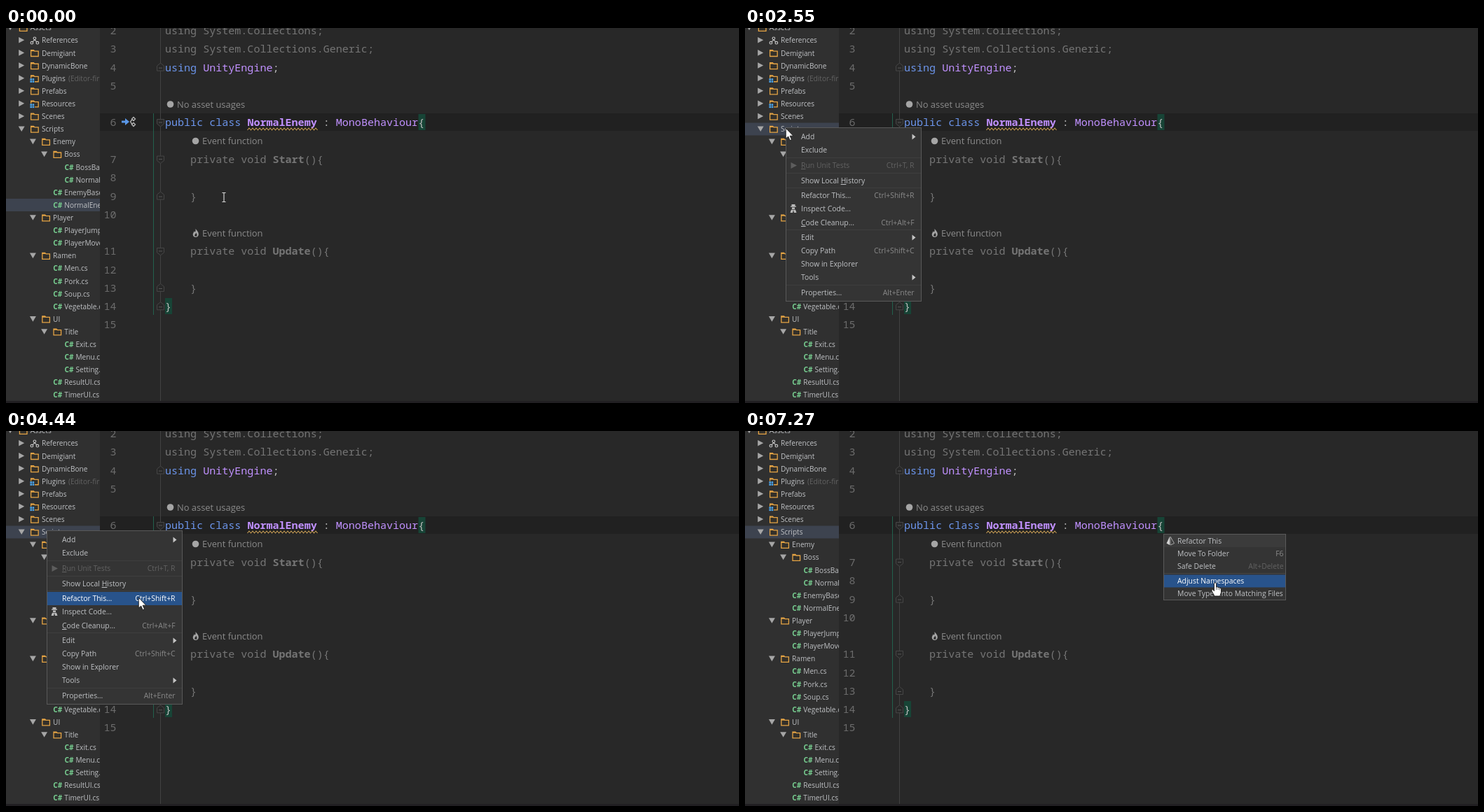
An HTML page that plays this animation: 1046x536 px, repeating every 8 s.

```html
<!DOCTYPE html>
<html lang="en">
<head>
<meta charset="utf-8">
<title>Code editor</title>
<style>
html, body { margin: 0; width: 100%; height: 100%; overflow: hidden; background: #282828; }
svg { display: block; width: 1046px; height: 536px; }
text { white-space: pre; }
.ui { font: 10.1px "Open Sans", sans-serif; fill: #bfc1c4; }
.menu { font: 10.4px "Open Sans", sans-serif; fill: #bfc1c4; }
.hint { font: 12.9px "Open Sans", sans-serif; fill: #8b8b8b; }
.code { font: 15.05px "Noto Sans Mono", monospace; fill: #bdbdbd; }
.cs { font: bold 10.2px "Open Sans", sans-serif; fill: #78cf91; }
.key { fill: #6c95eb; }
.type { fill: #c191ff; }
.dim { fill: #757575; }
.bold { font-weight: bold; }
.under { text-decoration: underline; }
.right { text-anchor: end; }
.num { fill: #6c6c6c; }
.soft { fill: #8a8a8a; }
.off { fill: #626262; }
.lit, .lit tspan { fill: #fff; }
</style>
</head>
<body>
<svg id="stage" viewBox="0 0 1046 536"></svg>
<script>
const NS = "http://www.w3.org/2000/svg";
const LOOP = 8000;
const EDITOR = "#282828", SIDE = "#303030", PANEL = "#343434";
const stage = document.getElementById("stage");

function add(parent, tag, attrs = {}, content) {
  const el = document.createElementNS(NS, tag);
  for (const k in attrs) el.setAttribute(k, attrs[k]);
  if (content !== undefined) el.textContent = content;
  parent.append(el);
  return el;
}
const group = (parent, x = 0, y = 0) => add(parent, "g", { transform: `translate(${x} ${y})` });
const rect = (parent, x, y, width, height, fill, more) =>
  add(parent, "rect", { x, y, width, height, fill, ...more });
const path = (parent, d, fill, stroke = "none", more) => add(parent, "path", { d, fill, stroke, ...more });
// Baselines sit on whole pixels to stay crisp.
const label = (parent, x, y, cls, str) => add(parent, "text", { x, y: Math.round(y), class: cls }, str);

// Each run is [class, string].
function runs(parent, x, y, cls, list) {
  const t = label(parent, x, y, cls);
  for (const [c, s] of list) add(t, "tspan", { class: c }, s);
  return t;
}
const show = (el, on) => { el.style.display = on ? "" : "none"; };

/* ---------- project tree ---------- */
rect(stage, 0, 0, 1046, 536, EDITOR);
rect(stage, 0, 0, 134, 536, SIDE);
const selection = rect(stage, 0, 244, 134, 18, "#3d434f");
const clip = add(add(stage, "defs"), "clipPath", { id: "side" });
rect(clip, 0, 0, 134, 536, "#000");
const tree = add(stage, "g", { "clip-path": "url(#side)" });

// Prefix: level, then ">" closed, "v" open, "-" file.
const ROWS = ("0vAssets 1>References 1>Demigiant 1>DynamicBone 1>Plugins 1>Prefabs 1>Resources 1>Scenes " +
  "1vScripts 2vEnemy 3vBoss 4-BossBase.cs 4-NormalBoss.cs 3-EnemyBase.cs 3-NormalEnemy.cs " +
  "2vPlayer 3-PlayerJump.cs 3-PlayerMove.cs 2vRamen 3-Men.cs 3-Pork.cs 3-Soup.cs 3-Vegetable.cs " +
  "2vUI 3vTitle 4-Exit.cs 4-Menu.cs 4-Setting.cs 3-ResultUI.cs 3-TimerUI.cs").split(" ");

function folder(g, special) {
  path(g, "M.7-4.3H4.5L6-2.8H11.3V4.6H.7Z", "#33302a", "#e5a445", { "stroke-width": 1.3 });
  path(g, "M.7-4.3H4.5L6-2.6H.7Z", "#e5a445");
  if (!special) return;
  rect(g, -1, -.5, 7, 7, SIDE);
  for (const [x, y] of [[-.5, 0], [2.7, 0], [-.5, 3.2], [2.7, 3.2]]) rect(g, x, y, 2.6, 2.6, "#4ba3e8");
}

function references(g) {
  const style = { "stroke-width": 1.2 };
  path(g, "M6-1L3 2M6-1L9 2", "none", "#c4c4c4", style);
  for (const [cx, cy] of [[6, -3], [2, 3.4], [10, 3.4]])
    add(g, "circle", { cx, cy, r: 1.8, fill: SIDE, stroke: "#c4c4c4", ...style });
}

ROWS.forEach((row, i) => {
  const level = +row[0], kind = row[1], name = row.slice(2);
  const x = 34.7 + 16.2 * level, y = -.3 + 18.11 * i;
  if (kind !== "-") {
    const mark = group(tree, x - 28.7, y - .5);
    path(mark, kind === "v" ? "M-4.5-3.7H4.5L0 4Z" : "M-4-4.3L4 0L-4 4.3Z", "#a6a6a6");
    const icon = group(tree, x - 16, y);
    if (name === "References") references(icon);
    else folder(icon, name === "Plugins" || name === "Resources");
  } else label(tree, x - 16, y + 3.6, "cs", "C#");
  label(tree, x, y + 3.6, "ui", name);
});
add(tree, "text", { x: 89, y: 76, class: "ui off", "font-style": "italic" }, "(Editor-first)");

/* ---------- editor ---------- */
const lineY = n => 135 + 26.28 * n;
rect(stage, 134, 122, 912, 25, "#212121");
rect(stage, 220, 0, 1, 536, "#414141");
rect(stage, 210, 122, 1, 288, "#23614d");
rect(stage, 588.5, 123, 10, 23, "#174436");
rect(stage, 227, 386, 10, 23, "#174436");

// Visual row of a line number; hint rows and the caret row shift the count.
const numberRow = n => n < 6 ? n - 7 : n === 6 ? 0 : n < 11 ? n - 5 : n - 4;
for (let n = 2; n <= 15; n++) label(stage, 157.5, lineY(numberRow(n)) + 5.4, "code num right", n);

const line = (row, indent, list) =>
  runs(stage, 227 + 9.03 * indent, lineY(row) + 5.4, "code", list);
line(-5, 0, [["dim", "using System.Collections;"]]);
line(-4, 0, [["dim", "using System.Collections.Generic;"]]);
line(-3, 0, [["key", "using "], ["type", "UnityEngine"], ["", ";"]]);
line(0, 0, [["key", "public class "], ["type bold", "NormalEnemy"], ["", " : "], ["type", "MonoBehaviour"], ["", "{"]]);
line(2, 4, [["dim", "private void "], ["dim bold", "Start"], ["dim", "(){"]]);
line(4, 4, [["dim", "}"]]);
line(7, 4, [["dim", "private void "], ["dim bold", "Update"], ["dim", "(){"]]);
line(9, 4, [["dim", "}"]]);
line(10, 0, [["", "}"]]);

let wave = "M344.5 146";
for (let x = 347, up = true; x < 445; x += 2.5, up = !up) wave += `L${x} ${up ? 143 : 146}`;
path(stage, wave, "none", "#cfa358", { "stroke-width": 1.1 });

label(stage, 244, 113.7, "hint", "No asset usages");
label(stage, 280, 166.2, "hint", "Event function");
label(stage, 280, 297.6, "hint", "Event function");
for (const [cx, cy] of [[234.5, 109], [270.5, 161.5]]) add(stage, "circle", { cx, cy, r: 4.8, fill: "#a5a5a5" });
const flame = group(stage, 270.7, 293);
path(flame, "M-.5-6C1.5-4 4.3-1.5 4.1 2C4 4.5 2 6 0 6C-2.5 6-4.2 4-4 1.7C-3.8 0-2.7-.8-2.3-2.6L-1-1.3C0-2.5 .3-4-.5-6Z", "#a5a5a5");
path(flame, "M.4-.2C1.8 1.2 2 2.5 1.6 4.2C.7 5-.8 5-1.5 4C-2 2.4 0 1.7 .4-.2Z", EDITOR);

function fold(y, opens) {
  const g = group(stage, 220.5, y);
  path(g, opens ? "M-5-5H5V1.5L0 5.5L-5 1.5Z" : "M-5 5.5H5V-1.5L0-5.5L-5-1.5Z", EDITOR, "#464646");
  path(g, opens ? "M-2.5-.5H2.5" : "M-2.5 1.5H2.5", "none", "#565656");
}
[0, 2, 7].forEach(r => fold(lineY(r) + .5, true));
[-3, 4, 9, 10].forEach(r => fold(lineY(r) - .5, false));

const gutterIcons = group(stage, 165, 134);
path(gutterIcons, "M0-1.5H5V-5L11 0L5 5V1.5H0Z", "#5a97e8");
path(gutterIcons, "M14.5-4L17-6.5L19.5-4L17-1.5Z M14.5 4L17 1.5L19.5 4L17 6.5Z M15-3.5L12.5 0L15 3.5", "none", "#b8b8b8", { "stroke-width": 1.3 });

const caret = rect(stage, 597, 123, 2, 22, "#d0d0d0");
rect(stage, 0, 533, 1046, 3, "#211f22");

/* ---------- menus ---------- */
// Item: [center y, text runs, shortcut, state]; state ">" submenu, "x" disabled.
const plain = s => [["", s]];
const MENU = [
  [155.5, plain("Add"), "", ">"],
  [174.5, plain("Exclude")],
  [196.5, [["under", "R"], ["", "un Unit Tests"]], "Ctrl+T, R", "x"],
  [218, [["", "Show Local "], ["under", "H"], ["", "istory"]]],
  [239.5, plain("Refactor This..."), "Ctrl+Shift+R"],
  [258.5, plain("Inspect Code...")],
  [278, [["under", "C"], ["", "ode Cleanup..."]], "Ctrl+Alt+F"],
  [299.5, plain("Edit"), "", ">"],
  [318.5, plain("Copy Path"), "Ctrl+Shift+C"],
  [337.5, plain("Show in Explorer")],
  [356.5, plain("Tools"), "", ">"],
  [378.5, plain("Properties..."), "Alt+Enter"]
];
const POPUP = [
  [175, plain("Move To Folder"), "F6"],
  [193.5, plain("Safe Delete"), "Alt+Delete", "fade"],
  [214.5, plain("Adjust Namespaces")],
  [232.5, plain("Move Types Into Matching Files")]
];

function buildItems(g, defs, box, rowH, textX, keyX) {
  return defs.map(([y, text, key, state]) => {
    const off = state === "x";
    const bar = rect(g, box[0] + 1, y - rowH / 2, box[2] - 2, rowH, "#28538b");
    const row = add(g, "g");
    runs(row, textX, y + 3.7, "menu" + (off ? " off" : ""), text);
    if (key) label(row, keyX, y + 3.7, "menu right " + (off || state === "fade" ? "off" : "soft"), key);
    if (state === ">") path(row, `M238.5 ${y - 4}L243.5 ${y}L238.5 ${y + 4}Z`, "#c4c4c4");
    return { y, off, bar, row, h: rowH / 2 };
  });
}
function panel(box) {
  const g = add(stage, "g");
  rect(g, box[0] + .5, box[1] + .5, box[2] - 1, box[3] - 1, PANEL, { stroke: "#595959" });
  return g;
}

const menuBox = [58, 142, 194, 249];
const menu = panel(menuBox);
for (const y of [185, 207, 228, 288, 367]) rect(menu, 59, y, 192, 1, "#3e3e3e");
const menuItems = buildItems(menu, MENU, menuBox, 19, 80, 241.5);
path(menu, "M65.5 192L74 196.5L65.5 201Z", "#5d5d5d");
const inspector = group(menu, 69, 258);
path(inspector, "M-2.5-6H2.5V-3.5H4V-2.3H-4V-3.5H-2.5Z M-2-1.5H2V1H-2Z M-4.5 6L-3 1.8H3L4.5 6Z", "#bcbcbc");
path(inspector, "M0 2L1 6H-1Z", PANEL);

const popupBox = [597, 147, 175, 95];
const popup = panel(popupBox);
rect(popup, 598, 148, 173, 18, "#3b3b3b");
rect(popup, 598, 203, 173, 1, "#464646");
label(popup, 617, 160.7, "menu", "Refactor This");
path(popup, "M606 151V163L601.5 160.5Z", "#d0d0d0");
path(popup, "M607 151L612.5 160.5L607 163Z", "none", "#a8a8a8");
const popupItems = buildItems(popup, POPUP, popupBox, 18, 617, 768.5);

function highlight(items, box, x, y, fallback) {
  const inside = x > box[0] && x < box[0] + box[2];
  const hit = (inside && items.find(it => !it.off && Math.abs(y - it.y) <= it.h)) || fallback;
  for (const it of items) {
    show(it.bar, it === hit);
    it.row.querySelectorAll("text").forEach(t => t.classList.toggle("lit", it === hit));
  }
}

/* ---------- pointer ---------- */
const beam = add(stage, "g");
path(beam, "M-2.5-6.5H-.8L0-6L.8-6.5H2.5M0-6V6M-2.5 6.5H-.8L0 6L.8 6.5H2.5", "none", "#e0e0e0", { "stroke-width": 1.1 });
const arrow = add(stage, "g");
path(arrow, "M.3 .3V15L3.7 12L6.2 17.6L8.5 16.5L6.1 11.2H10.8Z", "#fff", "#111", { "stroke-width": .8 });
const hand = add(stage, "g");
path(hand, "M-1.6 1.2C-1.6-.7 1.6-.7 1.6 1.2V6.2C2.2 5.3 4 5.6 4.1 6.8C4.8 6 6.3 6.5 6.4 7.7C7.2 7 8.5 7.6 8.5 8.8V13C8.5 15.2 7 16.2 7 19H-1.5C-1.5 16.5-3.7 14.7-4.7 12C-5.8 9.8-3.8 8.8-2.7 10.3L-1.6 11.7Z", "#fff", "#111", { "stroke-width": .9 });
path(hand, "M1.6 6V10M4.1 7V10M6.4 8V10.5", "none", "#333", { "stroke-width": .7 });

// [start, end, steps, [progress, x, y]...]
const MOVES = [
  [110, 180, 2, [0, 311, 242], [1, 317, 240]],
  [500, 1240, 13, [0, 317, 240], [.08, 313, 239], [.3, 260, 230], [.6, 172, 204], [1, 96, 168]],
  [1310, 1630, 5, [0, 96, 168], [.5, 72, 153], [1, 58, 143]],
  [3310, 4070, 13, [0, 58, 143], [.2, 63, 156], [.46, 84, 187], [.75, 128, 212], [1, 168, 226]],
  [4120, 4440, 6, [0, 168, 226], [.6, 184, 234], [1, 189, 238]],
  [6230, 7020, 13, [0, 189, 238], [.077, 192, 238], [.3, 285, 240], [.6, 490, 236], [.8, 605, 227], [1, 658, 217]],
  [7070, 7270, 3, [0, 658, 217], [1, 671, 217]]
];

function along(points, p) {
  const i = Math.max(1, points.findIndex(q => q[0] >= p));
  const a = points[i - 1], b = points[i], f = (p - a[0]) / (b[0] - a[0]);
  return [a[1] + (b[1] - a[1]) * f, a[2] + (b[2] - a[2]) * f];
}
function pointer(t) {
  let at = [311, 242];
  for (const [from, to, steps, ...points] of MOVES) {
    if (t < from) break;
    const k = Math.floor((t - from + 10) / (to - from) * (steps - 1)) + 1;
    at = along(points, Math.min(1, k / steps));
  }
  return at.map(Math.round);
}

const BLINKS = [110, 620, 1110, 1630, 2130, 2550];

function draw(t) {
  const [x, y] = pointer(t);
  const menuOpen = t >= 2550 && t < 5500, popupOpen = t >= 5550;
  const overPopup = popupOpen && x > 597;
  const editing = t < 2550 && x > 220;

  selection.setAttribute("y", t < 2300 ? 244 : 135.5);
  show(caret, BLINKS.filter(b => t >= b).length % 2 === 1);
  show(gutterIcons, t < 2550);
  show(menu, menuOpen);
  show(popup, popupOpen);
  highlight(menuItems, menuBox, x, y);
  highlight(popupItems, popupBox, x, y, popupItems[0]);

  for (const [el, on] of [[beam, editing], [hand, overPopup], [arrow, !editing && !overPopup]]) {
    show(el, on);
    el.setAttribute("transform", `translate(${x} ${y})`);
  }
}

const begin = performance.now();
function tick() {
  draw((performance.now() - begin) % LOOP);
  requestAnimationFrame(tick);
}
draw(0);
requestAnimationFrame(tick);
</script>
</body>
</html>
```
